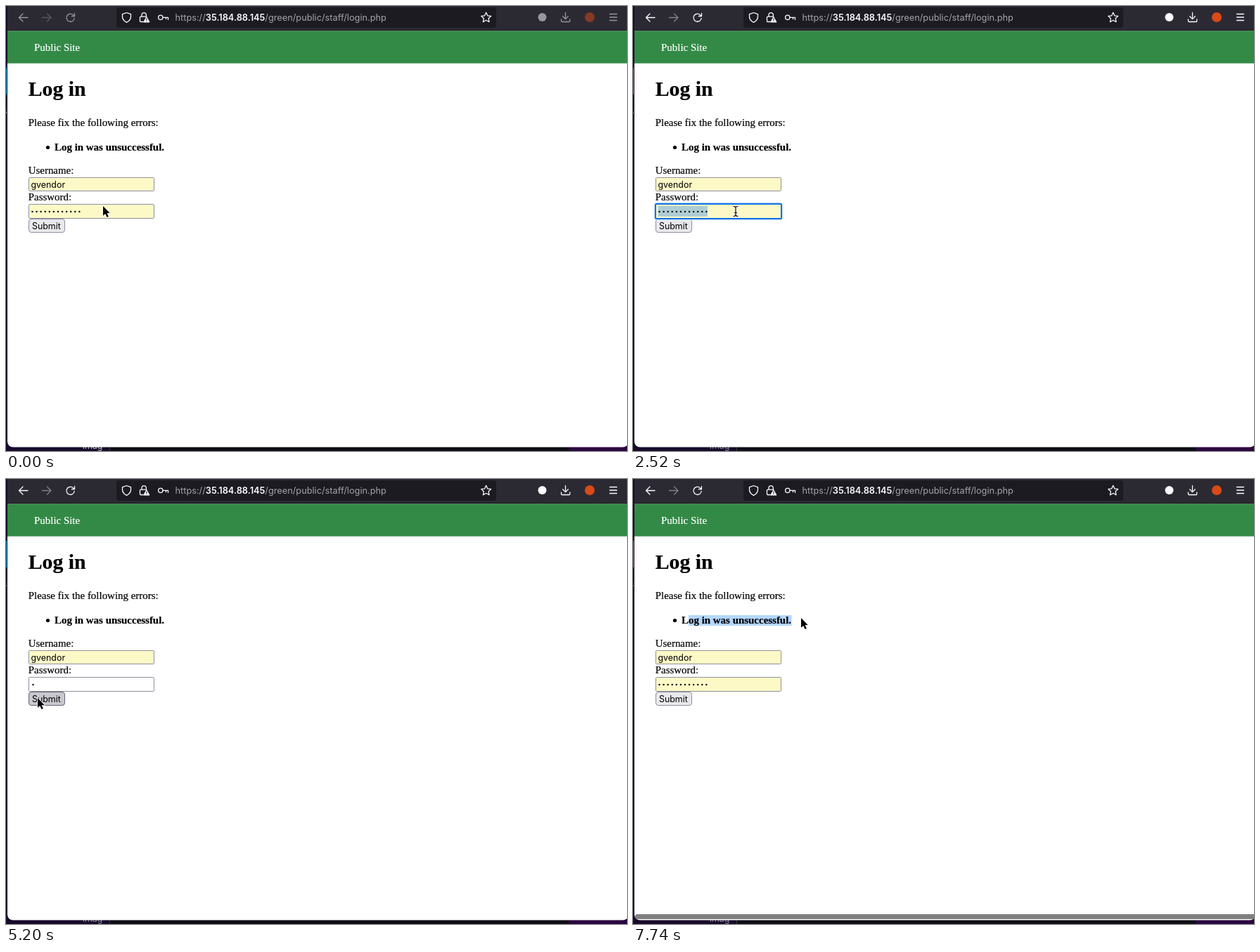
An HTML page that plays this animation: 883x634 px, repeating every 8 s.

```html
<!DOCTYPE html>
<html lang="en">
<head>
<meta charset="utf-8">
<title>Log in</title>
<style>
  html, body { margin: 0; width: 100%; height: 100%; overflow: hidden; background: #170a2a; }
  svg { display: block; width: 883px; height: 634px; }
  .serif { font: 14.95px "Liberation Serif", "Times New Roman", serif; }
  .serif text { fill: currentColor; stroke: currentColor; stroke-width: .2; }
  .serif .bold { font-weight: 700; }
  .ui { font: 12.4px Inter, "Open Sans", sans-serif; }
  .url { font-size: 12.75px; fill: #a3a3a9; }
  .url .host { font-weight: 600; fill: #fbfbfe; }
  .small { font-size: 11px; }
  .icon { fill: none; stroke: #fbfbfe; stroke-width: 1.3; stroke-linecap: round; stroke-linejoin: round; }
  .field { stroke: #8f8f9d; }
  .dots { stroke: #111; stroke-width: 2.5; stroke-linecap: round; stroke-dasharray: 0 6.08; }
  #panel { filter: drop-shadow(0 3px 4px #0006); }
  #tools.idle { opacity: .52; }
</style>
</head>
<body>
<svg viewBox="0 0 883 634">
  <defs>
    <clipPath id="frame"><rect x="2" y="-20" width="883" height="648.5" rx="8"/></clipPath>
    <path id="beamShape" d="M-3-7Q0-7 0-5Q0-7 3-7M0-5V5M-3 7Q0 7 0 5Q0 7 3 7M-1.500 2H1.500"/>
  </defs>

  <!-- desktop behind the window -->
  <rect width="883" height="634" fill="#170a2a"/>
  <rect y="88" width="1" height="38" fill="#16a5c9"/>
  <rect x="148" y="626" width="652" height="8" fill="#0e0c14"/>
  <rect x="147" y="626" width="1" height="8" fill="#38343f"/>
  <rect x="800" y="626" width="83" height="8" fill="#2b0540"/>
  <g class="ui" id="behind" fill="#fff">
    <text x="109" y="631">imag</text>
    <text x="-5" y="154">s</text>
  </g>

  <g clip-path="url(#frame)">
    <rect x="2" width="881" height="634" fill="#fff"/>
    <rect x="2" width="881" height="35" fill="#2b2a33"/>
    <rect x="2" y="34.500" width="881" height="1" fill="#0c0c0d"/>
    <rect x="157" y="2" width="540" height="29" rx="4" fill="#1c1b22"/>

    <g class="icon" id="tools">
      <path d="M31 16.500H18.500m5.500-5.500l-5.500 5.500 5.500 5.500"/>
      <path d="M51.500 16.500H64m-5.500-5.500l5.500 5.500-5.500 5.500" opacity=".42"/>
      <path id="reload" d="M96.300 13.500A5.600 5.600 0 1 0 97.200 17.500M97.500 10.500V14.500H93.500"/>
      <path id="stop" d="M86.500 11.500l10 10m0-10l-10 10"/>
      <circle cx="762.500" cy="16" r="6" fill="#fbfbfe" stroke="none"/>
      <path d="M795.500 9.500v9m-3.800-3.700l3.800 3.800 3.800-3.800M789.500 19v2.200q0 1.300 1.300 1.300h9.700q1.300 0 1.300-1.300V19"/>
      <circle cx="830" cy="16" r="7" fill="#d94a17" stroke="none"/>
      <path d="M858.500 11.500h10m-10 4.500h10m-10 4.500h10"/>
    </g>
    <g class="icon">
      <path d="M171.500 9.500l6 2.200v3.300q0 5.500-6 8.300-6-2.800-6-8.300v-3.300z"/>
      <path d="M193 15v-2.200a3.200 3.200 0 0 1 6.400 0V15M195 22.500h-3.300q-1.200 0-1.200-1.200v-5q0-1.200 1.200-1.200h8"/>
      <path d="M200 15.800l4 7.200h-8z" fill="#fbfbfe" stroke-width="1"/>
      <path d="M200 18v2.200m0 1.500v.1" stroke="#1c1b22" stroke-width="1.100"/>
      <circle cx="219.800" cy="16.300" r="3.200"/>
      <path d="M223 16.300h7.500v3m-3-3v2.300"/>
      <path d="M682.700 9.300l2.100 4.500 4.900.6-3.600 3.400.9 4.900-4.300-2.400-4.300 2.400.9-4.900-3.600-3.400 4.900-.6z"/>
    </g>
    <g class="ui">
      <text class="url" x="240.500" y="21">https://<tspan class="host">35.184.88.145</tspan>/green/public/staff/login.php</text>
    </g>

    <!-- page -->
    <rect x="2" y="35.500" width="881" height="46.200" fill="#338a46"/>
    <rect id="mark" x="78.900" y="194" height="15" fill="#b3d7ff"/>
    <g class="serif">
      <text x="40" y="64" color="#fff">Public Site</text>
      <text class="bold" x="31.700" y="128" font-size="29.800" style="font-size:29.8px">Log in</text>
      <text x="31.700" y="171">Please fix the following errors:</text>
      <circle cx="59.500" cy="201.500" r="2.600"/>
      <text class="bold" x="69" y="206">Log in was unsuccessful.</text>
      <text x="31.700" y="239">Username:</text>
      <text x="31.700" y="277">Password:</text>
    </g>
    <g class="ui">
      <rect class="field" x="32.500" y="244.500" width="178" height="19" rx="1" fill="#fdf9c7"/>
      <text x="35.500" y="258.500">gvendor</text>
      <rect id="button" x="32.500" y="303.500" width="51" height="19" rx="3.500"/>
      <text x="37" y="317.700">Submit</text>
      <rect class="field" id="pass" x="32.500" y="282.500" width="178" height="20" rx="1"/>
      <g id="ring" fill="none">
        <rect x="30.500" y="280.500" width="182" height="24" rx="3.500" stroke="#cfe2fa" stroke-width="1.800"/>
        <rect x="32" y="282" width="179" height="21" rx="1.500" stroke="#0b70e5" stroke-width="2"/>
      </g>
      <rect id="all" x="35.500" y="285" width="70.500" height="15" fill="#aecdd3"/>
      <path class="dots" id="dots"/>

      <g id="panel">
        <rect x="31" y="302" width="192" height="69" fill="#5b5b5b"/>
        <rect x="31" y="302" width="192" height="38" fill="#202020"/>
        <g fill="none" stroke="#686868">
          <circle cx="44" cy="314" r="6.300"/>
          <ellipse cx="44" cy="314" rx="2.800" ry="6.300"/>
          <path d="M38 314h12M39 310.800h10M39 317.200h10"/>
        </g>
        <g class="small">
          <text x="55" y="317.500" fill="#fff">gvendor</text>
          <text x="55" y="333" fill="#949494">From this website</text>
          <text x="126" y="359.500" fill="#f2f2f2" text-anchor="middle">View Saved Logins</text>
        </g>
      </g>

      <g id="status">
        <rect x="2" y="609" width="172" height="20" fill="#42414d"/>
        <text class="small" x="8" y="622.500" fill="#fbfbfe">Waiting for 35.184.88.145…</text>
      </g>
      <rect id="bar" x="3" y="620" width="890" height="7" rx="3.500" fill="#7f7f7f"/>
    </g>
  </g>

  <path id="arrow" d="M0 0V13.800L3.200 10.900 5.500 16 7.900 15 5.600 9.900H9.700Z" stroke="#fff" stroke-width="1.400" paint-order="stroke"/>
  <g id="beam" fill="none" stroke-linecap="round">
    <use href="#beamShape" stroke="#fff" stroke-width="2.800"/>
    <use href="#beamShape" stroke="#000" stroke-width="1.200"/>
  </g>
</svg>
<script>
  const LOOP = 8000, STEP = 148.2;
  const $ = id => document.getElementById(id);
  const show = (id, on) => $(id).style.display = on ? '' : 'none';
  const set = (id, attr, value) => $(id).setAttribute(attr, value);
  const within = (n, from, to) => n >= from && n < to;

  // pointer stops: tick, x, y
  const path = [
    [0, 138, 285], [4, 288, 89], [8, 180, 170], [12, 157, 280], [13, 155.5, 286],
    [16, 146, 292.5], [27, 146, 292.5], [30, 313, 263], [34, 45, 312], [38, 45, 312],
    [40, 101, 199], [44, 73, 203], [45, 73, 203], [46, 74, 203], [47, 74, 203],
    [51, 231, 199], [52, 239, 198], [60, 239, 198]
  ];

  function pointer(n) {
    const i = path.findIndex(p => p[0] > n);
    const [a, x, y] = path[i - 1], [b, x2, y2] = path[i];
    const k = (n - a) / (b - a);
    return [x + (x2 - x) * k, y + (y2 - y) * k];
  }

  function draw(time) {
    const n = Math.floor((time % LOOP) / STEP);
    const [x, y] = pointer(n);

    const active = n >= 11;
    $('tools').classList.toggle('idle', !active);
    $('behind').style.opacity = active ? .5 : .75;

    const loading = within(n, 36, 39);
    show('reload', !loading);
    show('stop', loading);
    show('status', loading);
    show('bar', n >= 39);

    const emptied = within(n, 23, 37);
    set('pass', 'fill', emptied ? '#fff' : '#fdf9c7');
    show('ring', within(n, 16, 34));
    show('all', within(n, 17, 23));
    show('dots', !within(n, 23, 27));
    set('dots', 'd', emptied ? 'M38.500 293h1' : 'M37.500 293h68');
    show('panel', within(n, 24, 27));

    const hover = within(n, 34, 39);
    set('button', 'fill', hover ? '#c8c8ce' : '#e9e9ed');
    set('button', 'stroke', hover ? '#676774' : '#8f8f9d');

    show('mark', n >= 48);
    set('mark', 'width', Math.max(0, Math.min(x, 225.5) - 78.9));

    const beam = within(n, 12, 29) || within(n, 40, 51);
    show('beam', beam);
    show('arrow', !beam);
    set(beam ? 'beam' : 'arrow', 'transform', `translate(${x} ${y})`);
  }

  const start = performance.now();
  function tick() {
    draw(performance.now() - start);
    requestAnimationFrame(tick);
  }
  tick();
</script>
</body>
</html>
```
